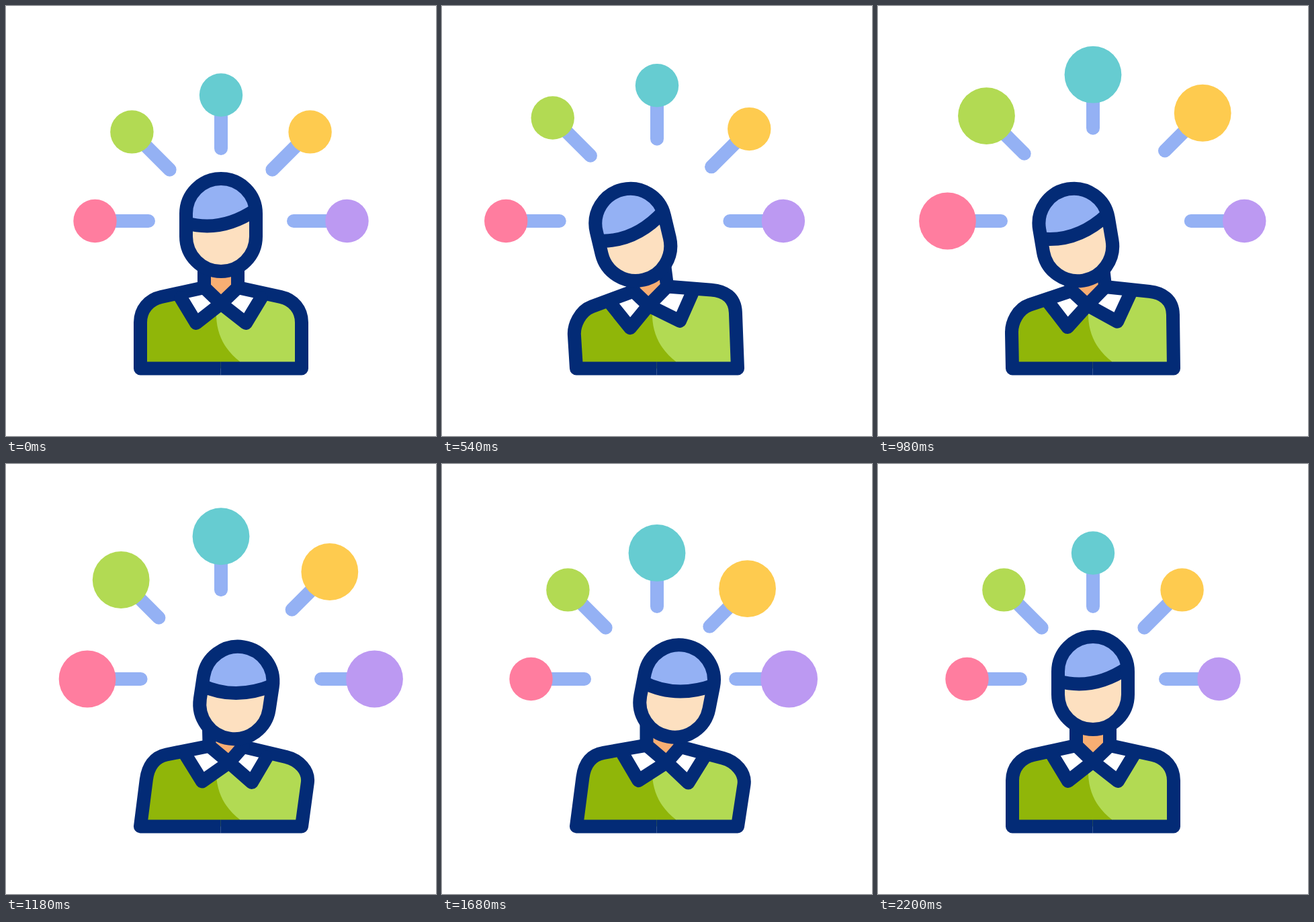
An HTML page for the animation above (2.4 s loop, 640 px wide and 640 px high).

```html
<!DOCTYPE html>
<html lang="en">
<head>
<meta charset="utf-8">
<title>Person with skills</title>
<style>
html, body { margin: 0; width: 100%; height: 100%; overflow: hidden; background: #fff; }
svg { display: block; width: 100vw; height: 100vh; }
.line { fill: none; stroke: #032b76; stroke-width: 20; stroke-linejoin: round; }
.stem { stroke: #94b1f4; stroke-width: 20; stroke-linecap: round; }
</style>
</head>
<body>
<svg viewBox="0 0 640 640">
  <g id="pins"></g>
  <path id="shirt" fill="#90b609"/>
  <path id="light" fill="#b2da53"/>
  <path id="collar" fill="#fff"/>
  <path id="neck" fill="#f8ae73"/>
  <path id="sideL" class="line"/>
  <path id="sideR" class="line"/>
  <path id="seams" class="line" stroke-linecap="round"/>
  <g id="head">
    <rect x="-52" y="-69" width="104" height="138" rx="52" fill="#fde0c0"/>
    <path id="hair" fill="#94b1f4"/>
    <path id="fringe" class="line"/>
    <rect class="line" x="-52" y="-69" width="104" height="138" rx="52"/>
  </g>
</svg>
<script>
const LOOP = 2400, MID = 320, BASE = 539.4;
const $ = id => document.getElementById(id);
const draw = (id, d) => $(id).setAttribute('d', d);
const clamp = v => Math.min(1, Math.max(0, v));
const inOut = p => u => u < .5 ? (2 * u) ** p / 2 : 1 - (2 - 2 * u) ** p / 2;
const quad = inOut(2), cubic = inOut(3);
const step = (t, from, to, ease) => ease(clamp((t - from) / (to - from)));

function add(parent, name, attrs) {
  const el = document.createElementNS('http://www.w3.org/2000/svg', name);
  for (const k in attrs) el.setAttribute(k, attrs[k]);
  return parent.appendChild(el);
}

// Pins stand on a half circle and move outwards one after the other.
const colors = ['#ff7d9f', '#b2da53', '#66ccd1', '#fecb4f', '#bc99f2'];
const reach = [38, 39.5, 33, 43.3, 41];

const pins = colors.map((fill, i) => {
  const angle = Math.PI * (1 + i / 4);
  const cos = Math.cos(angle), sin = Math.sin(angle);
  const group = add($('pins'), 'g', {});
  add(group, 'line', { class: 'stem', x1: 0, y1: 0, x2: -79.5 * cos, y2: -79.5 * sin });
  const ball = add(group, 'circle', { fill });
  return { i, cos, sin, group, ball };
});

function drawPin({ i, cos, sin, group, ball }, t) {
  const out = 125 * i, back = 725 + 115 * i;
  const k = reach[i] * (step(t, out, out + 600, quad) - step(t, back, back + 745, quad));
  const big = t >= out + 600 && t < out + 1540;
  group.setAttribute('transform', `translate(${MID + (187.5 + k) * cos} ${MID + 187.5 * sin + .92 * k * sin})`);
  ball.setAttribute('r', big ? 42.4 : 32.2);
}

// Half of the upright figure, as distance from the middle line and height.
const figure = {
  side: [120, 471], shoulder: [89, 433], joint: [60, 434],
  neck: [25, 419], top: [25, 385], tip: [37, 472]
};

// Point past b on the line from a.
const beyond = (a, b, k) => b.map((v, i) => v + (v - a[i]) * k);
const poly = (...pts) => 'M' + pts.join('L');

function drawPerson(t) {
  const toRight = step(t, 770, 1410, cubic);
  const left = step(t, 0, 620, cubic) - toRight;
  const right = toRight - step(t, 1400, 2195, cubic);
  const lean = right - left;

  // Leaning left turns the torso, leaning right mostly shifts it.
  const place = (x, y) => [
    MID + x + 11.5 * right - .13 * (495 - y) * left,
    y + (1 + .055 * x) * right + (2 - .14 * x) * left
  ];
  const cross = place(6 * lean, 443);

  const half = sign => {
    const p = {};
    for (const name in figure) p[name] = place(sign * figure[name][0], figure[name][1]);
    const base = [MID + sign * 120, BASE];
    p.arm = `M${p.neck}L${p.shoulder}C${beyond(p.neck, p.shoulder, .29)} `
      + `${beyond(base, p.side, .28)} ${p.side}L${base}H319.7`;
    p.flap = poly(p.neck, cross, p.tip, p.joint);
    p.seam = poly(p.top, p.neck, cross, p.tip, p.joint);
    return p;
  };
  const l = half(-1), r = half(1);

  draw('shirt', `${l.arm}H349L345 450L${cross}Z`);
  draw('light', `${r.arm}H349V530C328 514 314 492 313 462V450L${cross}Z`);
  draw('collar', l.flap + r.flap);
  draw('neck', poly(l.top, l.neck, cross, r.neck, r.top));
  draw('sideL', l.arm);
  draw('sideR', r.arm);
  draw('seams', l.seam + r.seam);

  const curve = `52 ${5 * right - 23}Q0 12 -52 -3`;
  draw('hair', `M-52 -3V-17A52 52 0 0 1 52 -17L${curve}`);
  draw('fringe', `M${curve}`);
  $('head').setAttribute('transform',
    `translate(${MID + 36 * lean} ${326 + 14.5 * (left + right)}) rotate(${13.5 * lean})`);
}

function frame() {
  const t = performance.now() % LOOP;
  pins.forEach(p => drawPin(p, t));
  drawPerson(t);
  requestAnimationFrame(frame);
}
frame();
</script>
</body>
</html>
```
